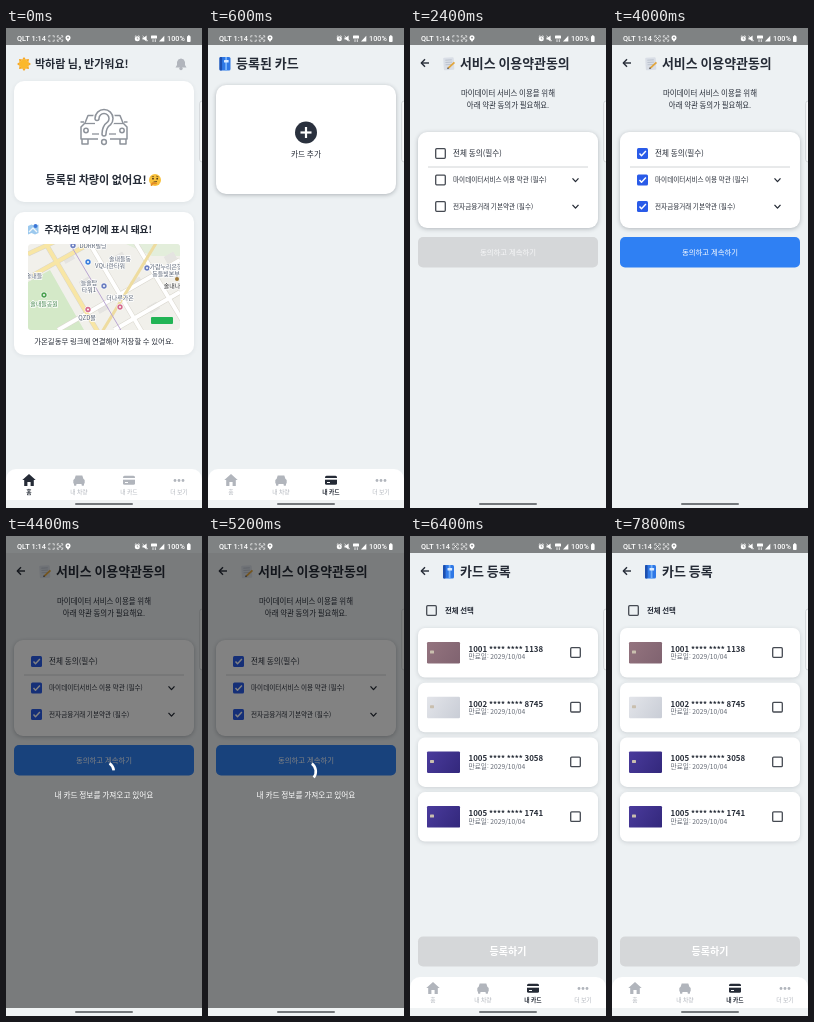
Recreate the animation shown at these times as an HTML page with a canvas. Size 196 by 480 pixels, loop 8 s.

```html
<!DOCTYPE html>
<html lang="ko">
<head>
<meta charset="utf-8">
<title>카드 등록</title>
<style>
html, body { margin: 0; width: 100%; height: 100%; overflow: hidden; background: #edf1f3; }
canvas { display: block; width: 196px; height: 480px; }
</style>
</head>
<body>
<canvas id="stage"></canvas>
<script>
const W = 196, H = 480, LOOP = 8000, TICK = 200;
const BG = '#edf1f3', INK = '#252b36', MUTED = '#b1b5bc', BLUE = '#2f80f3';
const FONT = '"Noto Sans CJK KR", "Noto Sans CJK", "Noto Sans", sans-serif';
const TAU = Math.PI * 2;

const canvas = document.getElementById('stage');
const ratio = window.devicePixelRatio || 1;
canvas.width = W * ratio;
canvas.height = H * ratio;
const c = canvas.getContext('2d');

function box(x, y, w, h, r, fill) {
  c.beginPath();
  c.roundRect(x, y, w, h, r);
  c.fillStyle = fill;
  c.fill();
}

function dot(x, y, r, fill) {
  c.beginPath();
  c.arc(x, y, r, 0, TAU);
  c.fillStyle = fill;
  c.fill();
}

// points: flat list x0, y0, x1, y1, ...
function trace(points) {
  c.beginPath();
  for (let i = 0; i < points.length; i += 2) c.lineTo(points[i], points[i + 1]);
}

function line(points, color, width, cap = 'butt') {
  trace(points);
  c.strokeStyle = color;
  c.lineWidth = width;
  c.lineCap = cap;
  c.lineJoin = 'round';
  c.stroke();
}

function poly(points, fill) {
  trace(points);
  c.fillStyle = fill;
  c.fill();
}

// y is the visual middle of the line
function text(s, x, y, size, { color = INK, weight = 400, align = 'left', font = FONT } = {}) {
  c.font = `${weight} ${size}px ${font}`;
  c.textAlign = align;
  c.fillStyle = color;
  c.fillText(s, x, y + size * 0.37);
}

function placed(x, y, angle, draw) {
  c.save();
  c.translate(x, y);
  c.rotate(angle);
  draw();
  c.restore();
}

function card(y, h, r = 10, shade = 0.16) {
  c.save();
  c.shadowColor = `rgba(40,50,60,${shade})`;
  c.shadowBlur = 4 * ratio;
  c.shadowOffsetY = ratio;
  box(8, y, 180, h, r, '#fff');
  c.restore();
}

function checkbox(x, y, on) {
  if (on) {
    box(x - 5.5, y - 5.5, 11, 11, 1.5, '#2a5be8');
    line([x - 3, y, x - 1, y + 2.3, x + 3.4, y - 2.5], '#fff', 1.4);
  } else {
    c.beginPath();
    c.roundRect(x - 4.8, y - 4.8, 9.6, 9.6, 1);
    c.strokeStyle = '#454a52';
    c.lineWidth = 1.3;
    c.stroke();
  }
}

function button(label, y, h, size, fill, color, weight) {
  box(8, y, 180, h, 5, fill);
  text(label, 98, y + h / 2, size, { color, weight, align: 'center' });
}

function scanIcon(x, crossed) {
  for (const sx of [-1, 1]) for (const sy of [-1, 1]) {
    line([x + sx * 2.7, 10.5 + sy, x + sx * 2.7, 10.5 + sy * 2.7, x + sx, 10.5 + sy * 2.7], '#fff', 0.7);
  }
  if (crossed) {
    line([x - 1.3, 9.2, x + 1.3, 11.8], '#fff', 0.8);
    line([x + 1.3, 9.2, x - 1.3, 11.8], '#fff', 0.8);
  }
}

function statusBar(t) {
  const white = { color: '#fff', font: 'Roboto, sans-serif', weight: 500 };
  box(0, 0, W, 17, 0, '#7f8283');
  text('QLT 1:14', 11, 10.5, 7.3, white);
  const spans = [[1400, 1800], [4000, 4400], [6200, 6800], [7200, 7400], [7800, 8000]];
  scanIcon(45.5, spans.some(([a, b]) => t >= a && t < b));
  scanIcon(54, true);
  dot(62, 9.7, 2.5, '#fff');
  poly([59.8, 10.8, 64.2, 10.8, 62, 14], '#fff');
  dot(62, 9.7, 0.9, '#7f8283');

  dot(131.3, 10.8, 2.5, '#fff');
  line([131.3, 9.3, 131.3, 11, 132.4, 11], '#7f8283', 0.6);
  line([128.8, 8.6, 130.2, 7.6], '#fff', 0.8);
  line([133.8, 8.6, 132.4, 7.6], '#fff', 0.8);
  poly([136.5, 9.5, 138, 9.5, 140.6, 7.6, 140.6, 13.4, 138, 11.6, 136.5, 11.6], '#fff');
  line([136.6, 7.8, 142, 13.2], '#fff', 0.7);
  box(145, 7.5, 6, 3, 0.6, '#fff');
  line([147, 14, 147, 11.3], '#fff', 0.8);
  line([149.3, 14, 149.3, 11.3], '#fff', 0.8);
  poly([153, 13.5, 158.3, 7.7, 158.3, 13.5], '#fff');
  text('100%', 161, 10.5, 7.3, white);
  box(181, 8, 3.6, 6, 0.8, '#fff');
  box(182, 7.2, 1.6, 1, 0, '#fff');
}

function systemEdges() {
  c.beginPath();
  c.roundRect(193.7, 73, 6, 61, 2.5);
  c.fillStyle = '#f8fafb';
  c.fill();
  c.strokeStyle = '#c3c8ca';
  c.lineWidth = 0.7;
  c.stroke();
  box(0, 472, W, 8, 0, '#f0f3f4');
  box(69, 475, 58, 2, 1, '#74787b');
}

function carFront(x, y, color) {
  poly([x - 4.8, y - 0.5, x - 3.3, y - 5, x + 3.3, y - 5, x + 4.8, y - 0.5], color);
  box(x - 5.7, y - 1.5, 11.4, 5, 1.5, color);
  box(x - 5, y + 2, 2.4, 3.2, 0.6, color);
  box(x + 2.6, y + 2, 2.4, 3.2, 0.6, color);
}

function navBar(active) {
  const tone = i => i === active ? INK : MUTED;
  box(0, 441, W, 31, [10, 10, 0, 0], '#fff');
  poly([16.3, 452, 23, 446, 29.7, 452, 27.8, 452, 27.8, 458, 24.6, 458, 24.6, 454, 21.4, 454, 21.4, 458, 18.2, 458, 18.2, 452], tone(0));
  carFront(73, 452.5, tone(1));
  box(117, 447.7, 12, 9, 1.5, tone(2));
  box(117, 450, 12, 1.7, 0, '#fff');
  box(119, 454, 3, 1, 0, '#fff');
  for (const dx of [-4, 0, 4]) dot(173 + dx, 452.5, 1.4, tone(3));
  ['홈', '내 차량', '내 카드', '더 보기'].forEach((label, i) =>
    text(label, 23 + i * 50, 464, 5.8, { color: tone(i), weight: i === active ? 700 : 400, align: 'center' }));
}

function notebook(x) {
  box(x - 5.5, 29, 11, 13.5, 1.5, '#2f78e6');
  box(x - 5.5, 29, 2.6, 13.5, 1, '#1d4fae');
  box(x + 0.2, 29, 1.8, 13.5, 0, '#76b2fa');
  box(x - 1, 32, 4.6, 2.6, 0.5, '#dcebff');
}

function memo() {
  placed(39, 35.5, -0.06, () => {
    box(-5.5, -6, 10.5, 12.5, 1, '#d9dee6');
    for (const y of [-3.5, -1.2, 1.1]) line([-3.5, y, 3, y], '#aab2c0', 0.6);
    line([-1, 4.5, 5.5, -0.8], '#e2a63c', 1.8);
    line([-1.8, 5.1, -0.8, 4.3], '#4b4a50', 1.4);
  });
}

function backArrow() {
  line([19, 35, 11.5, 35], INK, 1.4);
  line([15, 31.3, 11.3, 35, 15, 38.7], INK, 1.4);
}

function pageTitle(label, x, size = 13) {
  text(label, x, 35.5, size, { weight: 700 });
}

function parkedCars() {
  const gray = '#8d929a';
  for (const side of [1, -1]) {
    c.save();
    c.translate(98, 0);
    c.scale(side, 1);
    line([-10, 87.5, -16, 87.5, -19, 95, -23, 99, -23, 111, -6, 111], gray, 1.5);
    line([-19, 95.5, -9, 95.5], gray, 1.3);
    line([-20, 94, -23.5, 94], gray, 1.5);
    line([-22, 111, -22, 116, -16, 116, -16, 111], gray, 1.5);
    c.beginPath();
    c.arc(-18, 102.5, 2.2, 0, TAU);
    c.stroke();
    line([-12, 106, -5, 106], gray, 1.3);
    c.restore();
  }
  for (const [color, grow] of [['#fff', 4], [gray, 1.5], ['#fff', -1.5]]) {
    c.beginPath();
    c.arc(98, 90.5, 7, Math.PI, TAU + 0.75);
    c.quadraticCurveTo(98, 99, 98, 106);
    c.strokeStyle = color;
    c.lineWidth = 4 + grow;
    c.lineCap = 'round';
    c.stroke();
    dot(98, 114, 2.4 + grow / 2, color);
  }
}

function thinkingFace(x, y) {
  dot(x, y, 6, '#f9c23c');
  dot(x - 2, y - 1.3, 0.9, '#4a3418');
  dot(x + 2.2, y - 1.3, 0.9, '#4a3418');
  line([x - 3.3, y - 3.3, x - 1, y - 3.6], '#6a4718', 0.7);
  line([x + 1, y - 4, x + 3.5, y - 3.2], '#6a4718', 0.7);
  line([x - 1.5, y + 2, x + 2, y + 1.5], '#4a3418', 0.8);
  line([x - 3.5, y + 5, x - 2.5, y + 3.3, x + 1, y + 3.4], '#e58c24', 1.9, 'round');
}

function pin(x, y, color) {
  dot(x, y, 3.3, '#fff');
  dot(x, y, 2.7, color);
  dot(x, y, 1, '#fff');
}

function cityMap() {
  c.save();
  c.beginPath();
  c.roundRect(22, 216, 152, 86, 3);
  c.clip();
  c.fillStyle = '#f1f0eb';
  c.fill();
  poly([22, 254, 44, 242, 78, 302, 22, 302], '#d4e9c8');
  poly([120, 216, 174, 216, 174, 228, 146, 228], '#e3eedb');
  for (let i = 0; i < 7; i++) {
    placed(62 + i * 17, 230 + (i % 3) * 25, -0.5, () => box(-5, -4, 11, 8, 0.5, '#e5e4e1'));
  }
  const roads = [
    [22, 250, 90, 212], [52, 302, 174, 232], [108, 302, 174, 264], [40, 216, 92, 304],
    [84, 216, 136, 304], [128, 212, 176, 292], [22, 226, 50, 213]
  ];
  roads.forEach(r => line(r, '#d9d6cd', 5));
  roads.forEach((r, i) => line(r, i % 3 ? '#fff' : '#f8e6a5', 4));
  line([96, 304, 152, 212], '#eedca0', 3);
  line([64, 216, 116, 304], '#b9a5d2', 1);

  const name = (s, x, y, color = '#566172') => {
    c.font = `500 6px ${FONT}`;
    c.textAlign = 'center';
    c.strokeStyle = '#fff';
    c.lineWidth = 1.6;
    c.strokeText(s, x, y + 2.2);
    text(s, x, y, 6, { color, weight: 500, align: 'center' });
  };
  const violet = '#6c7fc0';
  pin(67, 217.5, violet);
  name('DDRR빌딩', 87, 218);
  name('솔내들', 28, 248);
  pin(82, 234, '#3d7fdc');
  name('VQ나란타워', 104, 238);
  name('솔내들동', 114, 231);
  name('늘솔탑', 83, 255);
  name('타워1', 83, 261.5);
  pin(98, 258, violet);
  pin(38, 267, '#4fa352');
  name('솔내들공원', 38, 276, '#3f8348');
  name('더나루가온', 114, 270);
  pin(114, 279, '#d56d8e');
  pin(82, 281.5, '#d56d8e');
  name('QZD몰', 81, 290);
  pin(141, 240, violet);
  name('가람누리은행', 160, 239);
  name('동들빛본부', 160, 245.5);
  name('솔내나', 166, 258, '#222');
  dot(171, 251, 2, '#a07a39');
  box(145, 289, 22, 7, 1, '#22b455');
  c.restore();
}

function homePage() {
  for (let i = 0; i < 8; i++) {
    placed(18, 36, i * TAU / 8, () => poly([-2, -4.2, 2, -4.2, 0, -7], '#f7a51d'));
  }
  dot(18, 36, 4.6, '#fbb82b');
  text('박하람 님, 반가워요!', 29, 36, 11, { weight: 700 });
  poly([169.5, 39.5, 171, 37, 171, 34, 172.3, 31.6, 175, 30.5, 177.7, 31.6, 179, 34, 179, 37, 180.5, 39.5], MUTED);
  dot(175, 40.5, 1.7, MUTED);

  card(53, 121, 10, 0.08);
  parkedCars();
  text('등록된 차량이 없어요!', 39.5, 151.5, 11.1, { weight: 700 });
  thinkingFace(149, 152);

  card(184, 143, 10, 0.08);
  poly([22, 198, 25.5, 196.5, 29, 198, 32.5, 196.5, 32.5, 205, 29, 206.5, 25.5, 205, 22, 206.5], '#9cc9ee');
  line([23, 204, 27, 200, 31, 204], '#f3f7fa', 1.3);
  dot(29.5, 198, 2, '#3b76d6');
  text('주차하면 여기에 표시 돼요!', 38.5, 201.5, 9.65, { weight: 700 });
  cityMap();
  text('가온길동무 링크에 연결해야 저장할 수 있어요.', 98, 313, 7.4, { align: 'center' });
  navBar(0);
}

function cardsPage() {
  notebook(17);
  pageTitle('등록된 카드', 28);
  card(57, 109, 10, 0.32);
  dot(98, 104.5, 11, '#2a313e');
  line([92.5, 104.5, 103.5, 104.5], '#fff', 2.2);
  line([98, 99, 98, 110], '#fff', 2.2);
  text('카드 추가', 98, 126.5, 7.7, { weight: 500, align: 'center' });
  navBar(2);
}

function termsPage(agreed) {
  const mid = { weight: 500, align: 'center' };
  backArrow();
  memo();
  pageTitle('서비스 이용약관동의', 50, 12.9);
  text('마이데이터 서비스 이용을 위해', 98, 65, 7.45, mid);
  text('아래 약관 동의가 필요해요.', 98, 77, 7.45, mid);
  card(104, 96, 9, 0.3);
  [125.5, 152, 178.5].forEach(y => checkbox(30.5, y, agreed));
  text('전체 동의(필수)', 43, 125.5, 7.6, { weight: 500 });
  line([18, 139, 178, 139], '#c6c9cc', 0.8);
  text('마이데이터서비스 이용 약관 (필수)', 43, 152, 6.6);
  text('전자금융거래 기본약관 (필수)', 43, 178.5, 6.6);
  for (const y of [152, 178.5]) line([162.5, y - 1.6, 165.5, y + 1.6, 168.5, y - 1.6], INK, 1.3);
  button('동의하고 계속하기', 209, 30.5, 7.4, agreed ? BLUE : '#d5d7d9', agreed ? '#fff' : '#f6f7f8', 500);
}

// cubic-bezier(.4, 0, .2, 1)
function ease(x) {
  let lo = 0, hi = 1;
  for (let i = 0; i < 20; i++) {
    const m = (lo + hi) / 2, n = 1 - m;
    if (1.2 * n * n * m + 0.6 * n * m * m + m * m * m < x) lo = m; else hi = m;
  }
  return 3 * (1 - lo) * lo * lo + lo ** 3;
}

function spinner(age) {
  const phase = age / 1333 % 1;
  const head = ease(Math.min(1, phase * 2)) * 0.75;
  const tail = ease(Math.max(0, phase * 2 - 1)) * 0.75;
  const start = (tail + age / 2222 + phase / 4 - 0.25) * TAU;
  c.beginPath();
  c.arc(98, 235.5, 9.8, start, start + Math.max(0.001, (head - tail) * TAU));
  c.strokeStyle = '#fff';
  c.lineWidth = 2.6;
  c.lineCap = 'butt';
  c.stroke();
}

function loading(t) {
  box(0, 17, W, 455, 0, 'rgba(0,0,0,.49)');
  spinner(t - 4250);
  text('내 카드 정보를 가져오고 있어요', 98, 259.5, 7.7, { color: '#fff', weight: 500, align: 'center' });
}

const CARDS = [
  ['1001 **** **** 1138', '#94747f', '#806370'],
  ['1002 **** **** 8745', '#e3e5ea', '#c9cdd6'],
  ['1005 **** **** 3058', '#4a3b9c', '#33287c'],
  ['1005 **** **** 1741', '#4a3b9c', '#33287c']
];

function cardRow([number, light, dark], i) {
  const y = 92 + i * 54.7, mid = y + 24.5;
  card(y, 49.5, 7, 0.18);
  const art = c.createLinearGradient(17, mid - 11, 50, mid + 11);
  art.addColorStop(0, light);
  art.addColorStop(1, dark);
  box(17, mid - 10.5, 33, 21.5, 1.2, art);
  box(20, mid - 2, 4, 3, 0.6, '#c9bfae');
  text(number, 58.5, mid - 3.5, 7.9, { weight: 700 });
  text('만료일: 2029/10/04', 58.5, mid + 4.5, 6.7, { color: '#626873' });
  checkbox(165.5, mid, false);
}

function registerPage() {
  backArrow();
  notebook(38.5);
  pageTitle('카드 등록', 50);
  checkbox(21.5, 74.5, false);
  text('전체 선택', 35, 74.5, 7.4, { weight: 700 });
  CARDS.forEach(cardRow);
  button('등록하기', 400.5, 30, 10, '#d5d7d9', '#fff', 700);
  navBar(2);
}

function render(t) {
  c.setTransform(ratio, 0, 0, ratio, 0, 0);
  box(0, 0, W, H, 0, BG);
  if (t < 400) homePage();
  else if (t < 2000) cardsPage();
  else if (t < 6400) termsPage(t >= 3000);
  else registerPage();
  systemEdges();
  if (t >= 4400 && t < 6400) loading(t);
  statusBar(t);
}

// The screen refreshes five times a second.
function loop() {
  const t = performance.now() % LOOP;
  render(Math.floor(t / TICK) * TICK);
  requestAnimationFrame(loop);
}
loop();
</script>
</body>
</html>
```
